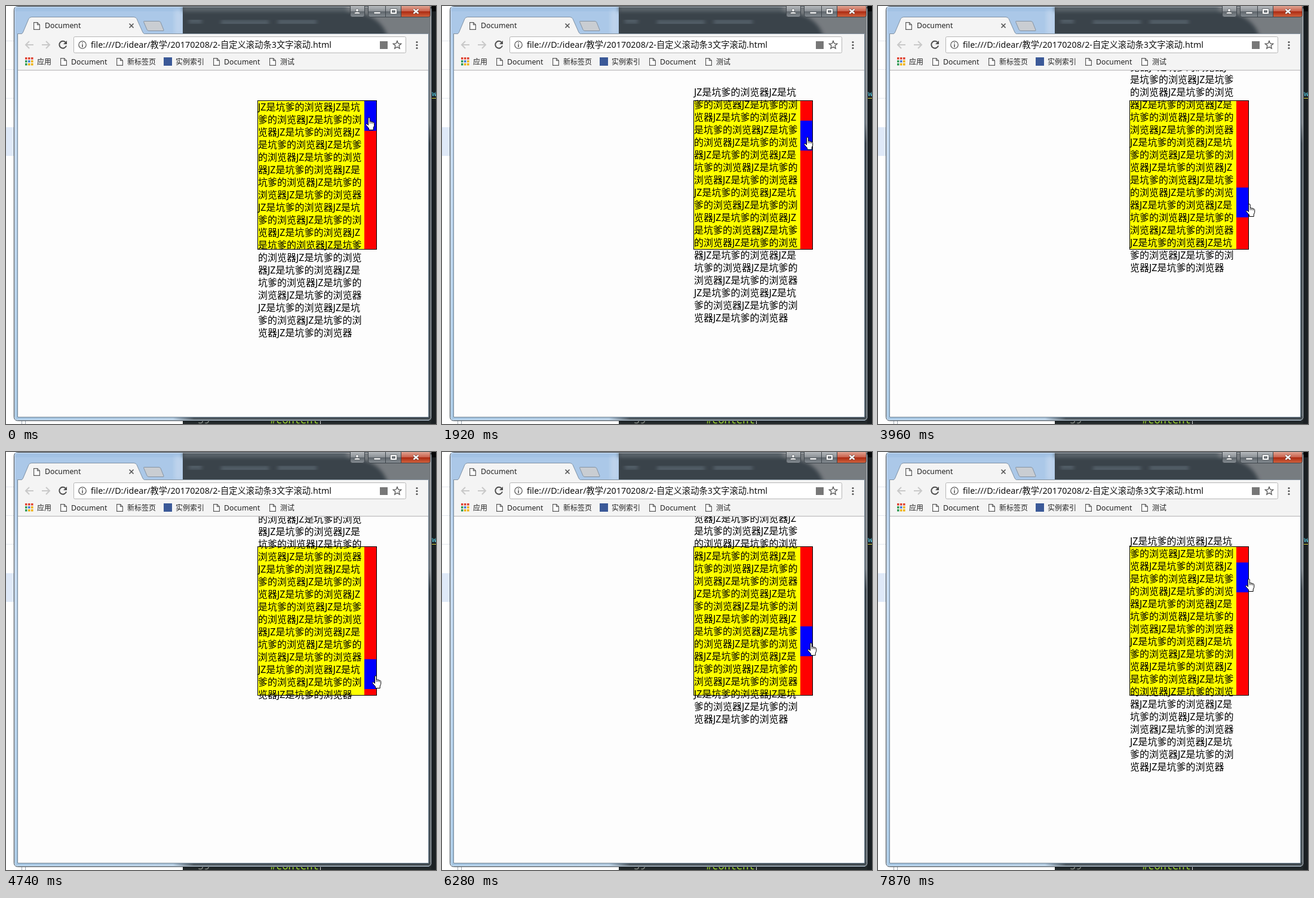
These frames come from a looping animation (720x700 px, 8 s). An HTML page:

```html
<!DOCTYPE html>
<html lang="zh-CN">
<head>
<meta charset="utf-8">
<title>Document</title>
<style>
html, body { margin: 0; width: 100%; height: 100%; overflow: hidden; background: #fff; }
body { font-family: 'Noto Sans', 'Noto Sans CJK SC', 'Noto Sans CJK', sans-serif; text-autospace: no-autospace; }
#stage { position: absolute; left: 0; top: 0; width: 720px; height: 700px; overflow: hidden; }
#stage * { position: absolute; }
#frame { left: 0; top: 0; }
#page { left: 20px; top: 108px; width: 687px; height: 580px; overflow: hidden; background: #fdfdfd; }
#box { left: 401px; top: 50px; width: 198px; height: 248px; border: 1px solid #000; background: #ff0; }
#text { left: 0; top: 0; width: 178px; font-size: 16px; line-height: 21px; color: #000; }
#bar { right: 0; top: 0; width: 20px; height: 248px; background: #f00; }
#thumb { left: 0; top: 0; width: 20px; height: 50px; background: #00f; }
#hand { left: 0; top: 0; overflow: visible; }
</style>
</head>
<body>
<div id="stage">
  <svg id="frame" width="720" height="700">
    <defs>
      <linearGradient id="left" x2="0" y2="1">
        <stop offset="0" stop-color="#a9c7e8"/><stop offset=".3" stop-color="#c3d8ee"/>
        <stop offset="1" stop-color="#a8c8e4"/>
      </linearGradient>
      <linearGradient id="right" x2="0" y2="1">
        <stop offset="0" stop-color="#7d8184"/><stop offset=".28" stop-color="#737a80"/>
        <stop offset=".33" stop-color="#3a4248"/><stop offset="1" stop-color="#4b555b"/>
      </linearGradient>
      <linearGradient id="foot">
        <stop offset="0" stop-color="#a8c8e4"/><stop offset=".38" stop-color="#b4cbe0"/>
        <stop offset=".43" stop-color="#4f5a62"/><stop offset="1" stop-color="#424b51"/>
      </linearGradient>
      <linearGradient id="glass" x2="0" y2="1">
        <stop offset="0" stop-color="#b5b9bd"/><stop offset=".48" stop-color="#8b9095"/>
        <stop offset=".5" stop-color="#5f666c"/><stop offset="1" stop-color="#858c92"/>
      </linearGradient>
      <linearGradient id="red" x2="0" y2="1">
        <stop offset="0" stop-color="#e0a392"/><stop offset=".48" stop-color="#c9604b"/>
        <stop offset=".5" stop-color="#ab2a12"/><stop offset="1" stop-color="#d1643f"/>
      </linearGradient>
      <filter id="soft" x="-20%" y="-50%" width="140%" height="200%"><feGaussianBlur stdDeviation="3"/></filter>
      <clipPath id="title"><rect x="15" y="1" width="697" height="46"/></clipPath>
      <g id="doc" fill="#fff" stroke="#5a5a5a" stroke-width="1.2">
        <path d="M.6.6H6.5L10.4 4.5V12.4H.6Z"/><path d="M6.5.6V4.5H10.4" fill="none"/>
      </g>
    </defs>

    <!-- desktop behind the window -->
    <path d="M0 58.500H14M0 106.500H14M0 154.500H14" stroke="#e4e8ee"/>
    <rect y="203" width="14" height="48" fill="#dfe9f8"/>
    <path d="M26.500 694V700M32.500 694V700" stroke="#9aa3ad"/>
    <rect x="296" y="690" width="424" height="10" fill="#22282a"/>
    <rect x="712" width="8" height="700" fill="#1b2023"/>
    <rect x="712" width="8" height="9" fill="#050607"/>
    <text x="713" y="151" font-size="13" fill="#59c6dc" font-family="'Noto Sans Mono', monospace">w</text>
    <path d="M713 154.500H720" stroke="#d9d13c"/>
    <g font-family="'Noto Sans Mono', monospace" font-size="17">
      <text x="321" y="699" fill="#8a8f88">39</text>
      <text x="442" y="699" fill="#a6e22e">#content</text>
    </g>
    <path d="M526.500 690V700" stroke="#ddd"/>

    <!-- window border and title bar -->
    <rect x="13.500" y=".5" width="699" height="694" rx="6" fill="url(#left)" stroke="#2d3842"/>
    <rect x="706" y="4" width="6" height="686" fill="url(#right)"/>
    <rect x="15" y="687" width="697" height="6" fill="url(#foot)"/>
    <g clip-path="url(#title)">
      <rect x="15" width="280" height="47" fill="#abc8e8"/>
      <path d="M15 0H295V9H15Z" fill="#a3c2e4"/>
      <rect x="282" y="8" width="14" height="39" fill="#bdd3ec" filter="url(#soft)"/>
      <rect x="296" width="418" height="47" fill="#3a434a"/>
      <rect x="296" width="418" height="9" fill="#5d666d" filter="url(#soft)"/>
      <path d="M570 -5H720V55H640C632 25 610 12 570 8Z" fill="#777c80" filter="url(#soft)"/>
      <path d="M306 25H328M360 28H440M455 27H520" stroke="#55616a" stroke-width="9" filter="url(#soft)"/>
      <path d="M296 44H640" stroke="#2c343a" stroke-width="7" filter="url(#soft)"/>
    </g>
    <rect x="14.500" y="1.500" width="697" height="692" rx="5" fill="none" stroke="#fff" stroke-opacity=".6"/>

    <!-- caption buttons -->
    <g stroke="#3e454b">
      <path d="M576.500 0V15Q576.500 18.500 580 18.500H597Q600.500 18.500 600.500 15V0" fill="url(#glass)"/>
      <path d="M606.500 0V15Q606.500 18.500 610 18.500H661.500V0M635.500 0V18" fill="url(#glass)"/>
      <path d="M661.500 0V18.500H706Q710.500 18.500 710.500 15V0" fill="url(#red)"/>
    </g>
    <g fill="#fff" stroke="#454b50" stroke-width=".7">
      <circle cx="588" cy="7" r="2.400"/><path d="M583 13Q583 10 588 10T593 13Z"/>
      <rect x="616" y="10" width="11" height="3"/>
      <path d="M643.500 4.500H654.500V13.500H643.500ZM646.500 7.500V10.500H651.500V7.500Z" fill-rule="evenodd"/>
    </g>
    <path d="M682.500 5.500L690.500 12.500M690.500 5.500L682.500 12.500" stroke="#5c3a35" stroke-width="4"/>
    <path d="M682.500 5.500L690.500 12.500M690.500 5.500L682.500 12.500" stroke="#fff" stroke-width="2.400"/>

    <!-- tabs -->
    <path d="M230.500 26.500Q230 25.500 232 25.500H256Q258 25.500 259 27.500L264 40Q264.500 41.500 263 41.500H239Q237 41.500 236 39.500Z" fill="#c9cdd2" stroke="#8593a3"/>
    <path d="M20 47.500H24Q27 47 28.500 44L38 21.500Q39.500 18.500 43 18.500H214Q217.500 18.500 219 21.500L229 44Q230.500 47 234 47.500" fill="#f4f4f4" stroke="#7f92a6"/>
    <rect x="19" y="47" width="689" height="61" fill="#f4f4f4"/>
    <path d="M19 46.500H26M233 46.500H708" stroke="#8593a0"/>
    <path d="M19.500 47V688.500H707.500V47" fill="none" stroke="#6f8293"/>
    <use href="#doc" x="46" y="27"/>
    <text x="65" y="37" font-size="12.300" fill="#222">Document</text>
    <path d="M206.500 29.500L213.500 36.500M213.500 29.500L206.500 36.500" stroke="#555" stroke-width="1.700"/>

    <!-- toolbar -->
    <g fill="none" stroke-width="2">
      <path d="M46 65H33.500M39 59L33 65L39 71M60 65H72.500M67 59L73 65L67 71" stroke="#c9c9c9"/>
      <path d="M100 61A6 6 0 1 0 101 66.500" stroke="#4f4f4f"/>
    </g>
    <path d="M102 58V64H96Z" fill="#4f4f4f"/>
    <rect x="113.500" y="51.500" width="556" height="27" rx="2" fill="#fff" stroke="#b5b5b5"/>
    <circle cx="128" cy="65" r="6.200" fill="none" stroke="#5a5a5a" stroke-width="1.300"/>
    <path d="M128 64V69M128 61V62.600" stroke="#5a5a5a" stroke-width="1.600"/>
    <text x="142" y="70" font-size="14.300" fill="#111">file:///D:/idear/教学/20170208/2-自定义滚动条3文字滚动.html</text>
    <rect x="626" y="59" width="13" height="13" fill="#777"/>
    <path d="M655 58.500L656.900 63L661.700 63.300L658 66.400L659.200 71.200L655 68.600L650.800 71.200L652 66.400L648.300 63.300L653.100 63Z" fill="none" stroke="#555" stroke-width="1.300"/>
    <g fill="#555"><circle cx="688" cy="60.500" r="1.600"/><circle cx="688" cy="65.500" r="1.600"/><circle cx="688" cy="70.500" r="1.600"/></g>

    <!-- bookmarks -->
    <g id="apps"></g>
    <g id="marks" font-size="12.300" fill="#222"></g>
    <rect x="264" y="86" width="14" height="14" fill="#3b5998"/>
    <path d="M20 107.500H707" stroke="#b4b2b4"/>
  </svg>

  <div id="page">
    <div id="box">
      <div id="bar"><div id="thumb"></div></div>
      <div id="text"></div>
    </div>
  </div>
  <svg id="hand" width="17" height="23">
    <path d="M4.500 2C4.500.2 7.200.2 7.200 2V7.700C7.400 6.600 9.700 6.700 9.700 8.200C10 7.300 12.200 7.500 12.200 9C12.600 8.300 14.700 8.600 14.700 10.500V14.500L13.200 18V21.500H5.600V19L1 13.600C-.2 11.800 1.500 10.600 2.800 11.900L4.500 13.600Z" fill="#fff" stroke="#000"/>
    <path d="M7.200 7.700V11M9.700 8.200V11M12.200 9V11.500" stroke="#000" stroke-width=".8"/>
  </svg>
</div>
<script>
const $ = id => document.getElementById(id);
const LOOP = 8000, TRAVEL = 198, OVERFLOW = 149;

$('text').textContent = 'JZ是坑爹的浏览器'.repeat(26);

const dots = ['#e0402f', '#e0402f', '#e0402f', '#2f9a52', '#3f78d8', '#eeb211', '#2f9a52', '#eeb211', '#eeb211'];
$('apps').innerHTML = dots.map((c, i) =>
  `<rect x="${32 + i % 3 * 5}" y="${86 + (i / 3 | 0) * 5}" width="3.500" height="3.500" fill="${c}"/>`).join('');

// label, x, has page icon
const marks = [['应用', 52], ['Document', 109, 1], ['新标签页', 203, 1], ['实例索引', 284], ['Document', 365, 1], ['测试', 459, 1]];
$('marks').innerHTML = marks.map(([s, x, icon]) =>
  (icon ? `<use href="#doc" x="${x - 18}" y="87"/>` : '') +
  `<text x="${x}" y="98" font-size="${s === 'Document' ? 12.3 : 12}">${s}</text>`).join('');

// time, drag distance, pointer x
const path = [
  [0, 0, 602], [500, 1, 602], [810, 3, 602], [1800, 28, 605], [1920, 33, 606],
  [2880, 74, 611], [3030, 80, 612], [3960, 145, 616], [4740, 188, 613],
  [5010, 204, 612], [5160, 206, 613], [5590, 200, 613], [6270, 133, 612],
  [6550, 108, 615], [7050, 66, 631], [7570, 29, 618], [7720, 27, 616], [7870, 26, 615]
];

// the picture refreshes only at these times: first, last, count
const runs = [[0, 0, 1], [500, 500, 1], [810, 1800, 8], [1920, 2880, 8], [3030, 3960, 8], [4080, 5010, 8],
  [5160, 5160, 1], [5590, 6550, 8], [6670, 7570, 8], [7720, 7870, 2]];
const ticks = runs.flatMap(([a, b, n]) =>
  Array.from({ length: n }, (_, i) => Math.floor((a + (n > 1 ? (b - a) * i / (n - 1) : 0)) / 10) * 10));

function pose(t) {
  const i = path.findIndex(k => k[0] > t);
  if (i < 0) return path[path.length - 1].slice(1);
  const a = path[i - 1], b = path[i], p = (t - a[0]) / (b[0] - a[0]);
  return [1, 2].map(j => Math.round(a[j] + (b[j] - a[j]) * p));
}

const move = (id, x, y) => { $(id).style.transform = `translate(${x}px, ${y}px)`; };

function draw() {
  const now = performance.now() % LOOP;
  const [drag, x] = pose(ticks.filter(t => t <= now).pop());
  const top = Math.min(TRAVEL, drag);
  move('thumb', 0, top);
  move('text', 0, -Math.round(top * OVERFLOW / TRAVEL));
  move('hand', x, drag + 186);
  requestAnimationFrame(draw);
}
draw();
</script>
</body>
</html>
```
